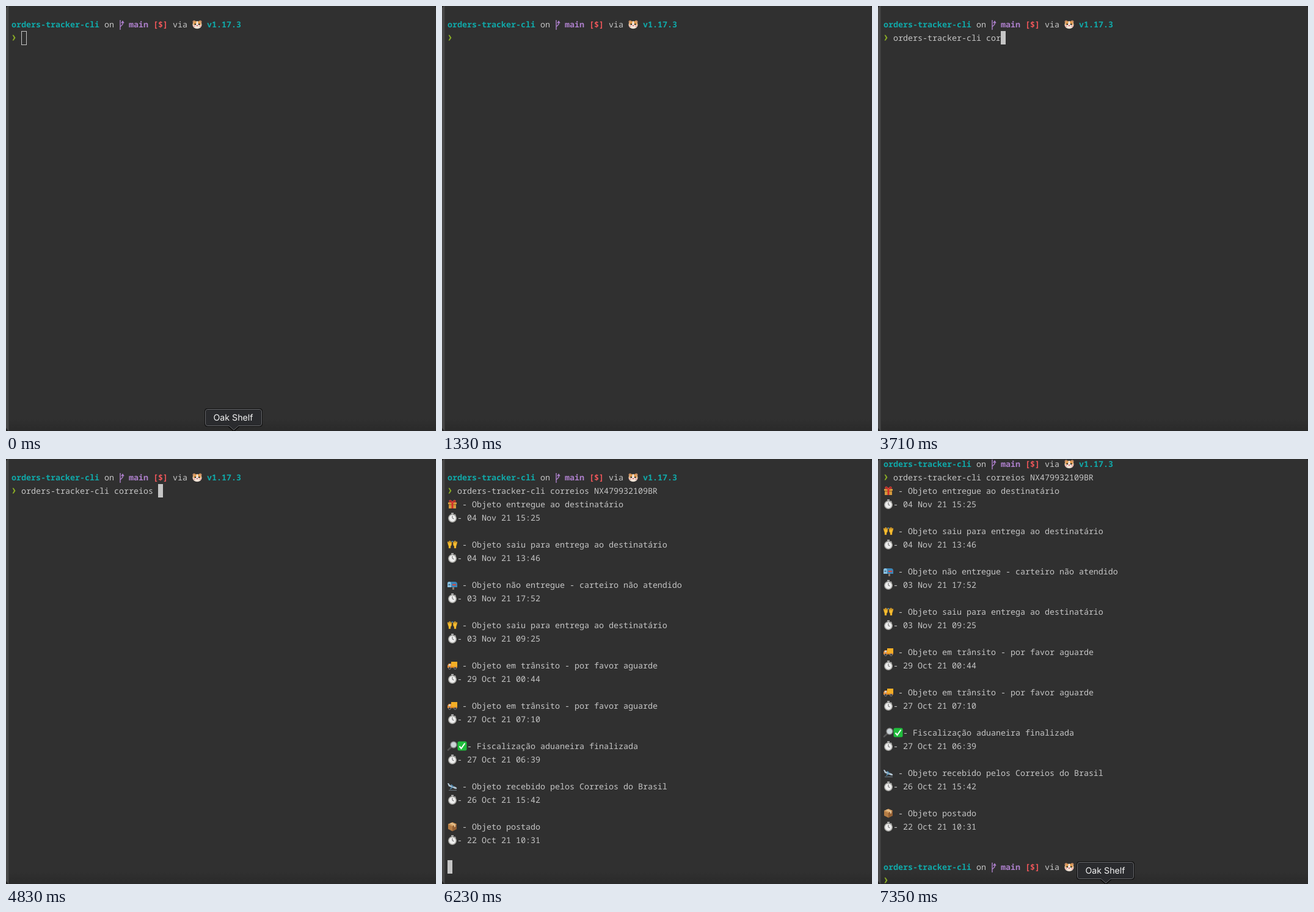
An HTML page for the animation above (7700 ms loop, 704x696 px).

```html
<!DOCTYPE html>
<html lang="en">
<head>
<meta charset="utf-8">
<title>Terminal order tracker</title>
<style>
html, body { margin: 0; width: 100%; height: 100%; overflow: hidden; background: #303030; }
svg { display: block; width: 704px; height: 696px; }
text { white-space: pre; text-rendering: geometricPrecision; }
#screen { font: 13.333px "Noto Sans Mono", "DejaVu Sans Mono", monospace; fill: #c5c5c5; }
#screen .bold { font-weight: 700; }
#tip text { font: 14.2px Inter, Roboto, sans-serif; fill: #f4f4f4; text-anchor: middle; }
.teal { fill: #10a9a9; }
.purple { fill: #ac7fca; }
.red { fill: #f0575a; }
</style>
</head>
<body>
<svg viewBox="0 0 704 696">
  <defs>
    <linearGradient id="shade" x1="0" y1="0" x2="0" y2="1">
      <stop offset="0" stop-color="#303030"/>
      <stop offset="1" stop-color="#2a2a2a"/>
    </linearGradient>
  </defs>
  <rect width="704" height="696" fill="#303030"/>
  <rect y="676" width="704" height="20" fill="url(#shade)"/>
  <rect width="4" height="696" fill="#474747"/>
  <rect x="4" width="1" height="696" fill="#393939"/>
  <path d="M0 0h3L0 3zM704 0h-3l3 3zM0 696v-5l4 5z" fill="#222"/>
  <g id="screen">
    <g id="top"></g>
    <text id="typed" x="25" y="57"></text>
    <g id="output"></g>
    <g id="next"></g>
    <rect id="cursor" width="8" height="22"/>
  </g>
  <g id="tip">
    <path d="M330 660H415Q419 660 419 664V684Q419 688 415 688H382L373 696L364 688H330Q326 688 326 684V664Q326 660 330 660Z" fill="#2a2b2e" stroke="#0c0c0c" stroke-width="2"/>
    <path d="M330 660.5H415Q418.500 660.500 418.500 664V684Q418.500 687.500 415 687.500H381L373 694.500L365 687.500H330Q326.500 687.500 326.500 684V664Q326.500 660.500 330 660.500Z" fill="none" stroke="#68696c"/>
    <text x="372" y="679">Oak Shelf</text>
  </g>
</svg>
<script>
const LOOP = 7700, COL = 8, ROW = 22, LEFT = 9, TOP = 19;
const COMMAND = 'orders-tracker-cli correios NX479932109BR';
const $ = id => document.getElementById(id);

// Each icon fills a 16 x 16 box.
const icons = {
  hamster: `<circle cx="3" cy="4" r="2.5" fill="#c58b62"/><circle cx="13" cy="4" r="2.500" fill="#c58b62"/>
    <ellipse cx="8" cy="9" rx="7.500" ry="6.200" fill="#f0e3d6"/>
    <path d="M2 6Q4 2 7 3L6 8L1 9ZM14 6Q12 2 9 3L10 8L15 9Z" fill="#e19a4c"/>
    <circle cx="4.800" cy="8" r="1.200" fill="#222"/><circle cx="11.200" cy="8" r="1.200" fill="#222"/>
    <circle cx="3" cy="11" r="1.500" fill="#eda5a0"/><circle cx="13" cy="11" r="1.500" fill="#eda5a0"/>
    <ellipse cx="8" cy="10" rx="1.300" ry="1" fill="#d0606a"/>`,
  gift: `<path d="M1 5H15V8H14V15H2V8H1Z" fill="#d49a3e"/><path d="M2 8H14V9.500H2Z" fill="#a66c24"/>
    <path d="M6.500 5H9.500V15H6.500Z" fill="#d32d2a"/>
    <path d="M8 5Q2 6 3 2Q6 0 8 5Q10 0 13 2Q14 6 8 5" fill="#a92824" stroke="#e2473c"/>`,
  hands: `<g fill="#f5bd30" stroke="#d58e20" stroke-width=".4">
    <path d="M1 8L0 4L1.500 3L2.500 6L3 2L4.500 2L5 6L6 3L7 4L6.500 9L5 11V14H2V11Z"/>
    <path d="M15 8L16 4L14.500 3L13.500 6L13 2L11.500 2L11 6L10 3L9 4L9.500 9L11 11V14H14V11Z"/></g>
    <path d="M7 2L7.500 4M9 2L8.500 4" stroke="#5aaee0" stroke-width=".8"/>`,
  mailbox: `<path d="M8 11H11V16H8Z" fill="#8d7868"/><path d="M3 3H12Q16 3 16 7V12H0V6Q0 3 3 3Z" fill="#3f84b4"/>
    <path d="M0 12V6Q0 3 3 3Q6 3 6 7V12Z" fill="#8bc0de"/><path d="M1.500 7H4.500V8.500H1.500Z" fill="#315a78"/>
    <path d="M8 7H14V9H8Z" fill="#d9473d"/>`,
  truck: `<path d="M6 2H16V12H6Z" fill="#f4ae26"/><path d="M6 10H16V12H6Z" fill="#d47d20"/>
    <path d="M2 5H6V12H0V8Z" fill="#e78931"/><path d="M2.500 6H5V8.500H1.200Z" fill="#c7dbe5"/>
    <g fill="#262626" stroke="#aaa" stroke-width=".8"><circle cx="3.500" cy="12.500" r="1.800"/><circle cx="12.500" cy="12.500" r="1.800"/></g>`,
  lens: `<path d="M7 9L1 14.500" stroke="#555" stroke-width="2.600" stroke-linecap="round"/>
    <circle cx="10" cy="6" r="5" fill="#cbd3d6" stroke="#8b8b8b" stroke-width="1.400"/>`,
  check: `<rect x=".5" y=".5" width="15" height="15" rx="2.500" fill="#20bd3c"/>
    <path d="M3.500 8.500L6.500 12L12.500 3.500" fill="none" stroke="#fff" stroke-width="2"/>`,
  plane: `<path d="M0 3L2 3L4 6L13 9Q16 10.500 15 12Q13 13 10 11L2 8Z" fill="#b2c5d2"/>
    <path d="M5 5L7 5L11 9L8 9ZM6 9L9 10L5 13L4 12.500Z" fill="#5088ae"/>
    <path d="M2 14.500H15" stroke="#68747c" stroke-width="1.200"/>`,
  box: `<path d="M8 1L15 4V12L8 15.500L1 12V4Z" fill="#b57d45"/><path d="M8 1L15 4L8 7.500L1 4Z" fill="#d6a265"/>
    <path d="M8 7.500L15 4V12L8 15.500Z" fill="#946034"/><path d="M4 2.700L11 6V9L13 8V5L6 2Z" fill="#e5c79a"/>`,
  watch: `<path d="M6 0H10V2H9V4H7V2H6ZM12 2L14 4L13 5L11 3Z" fill="#a4a4a4"/>
    <circle cx="8" cy="9" r="6.200" fill="#eee" stroke="#a8a8a4" stroke-width="1.500"/>
    <path d="M8 9V5M8 9L10.500 10" stroke="#555" stroke-width=".9"/>`
};

const top0 = row => TOP + row * ROW;
const text = (col, row, string, style = '') =>
  `<text x="${LEFT + col * COL}" y="${top0(row) + 16}" class="${style}">${string}</text>`;
const icon = (col, row, name) =>
  `<g transform="translate(${LEFT + col * COL} ${top0(row) + 3})">${icons[name]}</g>`;

const prompt = row =>
  text(0, row, 'orders-tracker-cli', 'teal bold') + text(19, row, 'on') +
  `<path transform="translate(185 ${top0(row)})" d="M2 4V20M2 15L6 11V7M4 9L6 6L8 9" fill="none" stroke="#ac7fca" stroke-width="1.400"/>` +
  text(24, row, 'main', 'purple bold') + text(29, row, '[$]', 'red bold') +
  text(33, row, 'via') + icon(37, row, 'hamster') + text(40, row, 'v1.17.3', 'teal bold') +
  `<path transform="translate(10 ${top0(row + 1)})" d="M.5 6.500H2.500L5.500 11L2.500 15.500H.5L3 11Z" fill="#8aac25"/>`;

const events = [
  ['gift', 'Objeto entregue ao destinatário', '04 Nov 21 15:25'],
  ['hands', 'Objeto saiu para entrega ao destinatário', '04 Nov 21 13:46'],
  ['mailbox', 'Objeto não entregue - carteiro não atendido', '03 Nov 21 17:52'],
  ['hands', 'Objeto saiu para entrega ao destinatário', '03 Nov 21 09:25'],
  ['truck', 'Objeto em trânsito - por favor aguarde', '29 Oct 21 00:44'],
  ['truck', 'Objeto em trânsito - por favor aguarde', '27 Oct 21 07:10'],
  ['lens', 'Fiscalização aduaneira finalizada', '27 Oct 21 06:39'],
  ['plane', 'Objeto recebido pelos Correios do Brasil', '26 Oct 21 15:42'],
  ['box', 'Objeto postado', '22 Oct 21 10:31']
];

$('top').innerHTML = prompt(0);
$('next').innerHTML = prompt(30);
$('output').innerHTML = events.map(([name, label, date], i) => {
  const row = 2 + i * 3, customs = name === 'lens';
  return icon(0, row, name) + (customs ? icon(2, row, 'check') : '') +
    text(customs ? 4 : 3, row, '- ' + label) +
    icon(0, row + 1, 'watch') + text(2, row + 1, '- ' + date);
}).join('');

// Time and number of characters on the command line; jumps are completion and paste.
const keys = [
  [1610, 1], [1820, 2], [1890, 3], [2100, 4], [2310, 5], [2520, 19],
  [3290, 20], [3430, 21], [3640, 22], [3850, 23], [3990, 24],
  [4130, 25], [4270, 26], [4410, 27], [4550, 28], [5390, 41]
];
const ENTER = 5740, OUTPUT = 6230, DONE = 6300;
const blinks = [[1330, 1610], [5040, 5390], [7070, LOOP]];

const show = (node, on) => node.setAttribute('visibility', on ? 'visible' : 'hidden');
const clamp = v => Math.max(0, Math.min(1, v));

function tipOpacity(t) {
  const stepsOut = Math.floor((t - 560) / 70) + 1;
  const stepsIn = Math.floor((t - 7070) / 70) + 1;
  return t < 5000 ? clamp(1 - stepsOut / 7) : clamp(stepsIn / 5);
}

function cursorCell(t, count) {
  if (t >= DONE) return [2, 31];
  if (t >= OUTPUT) return [0, 29];
  if (t >= ENTER) return [0, 2];
  return [2 + count, 1];
}

function render(t) {
  const count = keys.reduce((n, [time, size]) => t >= time ? size : n, 0);
  $('typed').textContent = COMMAND.slice(0, count);
  show($('output'), t >= OUTPUT);
  show($('next'), t >= DONE);
  $('screen').setAttribute('transform', `translate(0 ${t >= DONE ? -ROW : 0})`);

  const [col, row] = cursorCell(t, count), hollow = t < 840, cursor = $('cursor');
  const inset = hollow ? 0.5 : 0;
  cursor.setAttribute('x', LEFT + col * COL + inset);
  cursor.setAttribute('y', top0(row) + inset);
  cursor.setAttribute('fill', hollow ? 'none' : '#c5c5c5');
  cursor.setAttribute('stroke', hollow ? '#c5c5c5' : 'none');
  show(cursor, !blinks.some(([from, to]) => t >= from && t < to));
  $('tip').setAttribute('opacity', tipOpacity(t));
}

const start = performance.now();
function tick() {
  render((performance.now() - start) % LOOP);
  requestAnimationFrame(tick);
}
tick();
</script>
</body>
</html>
```
